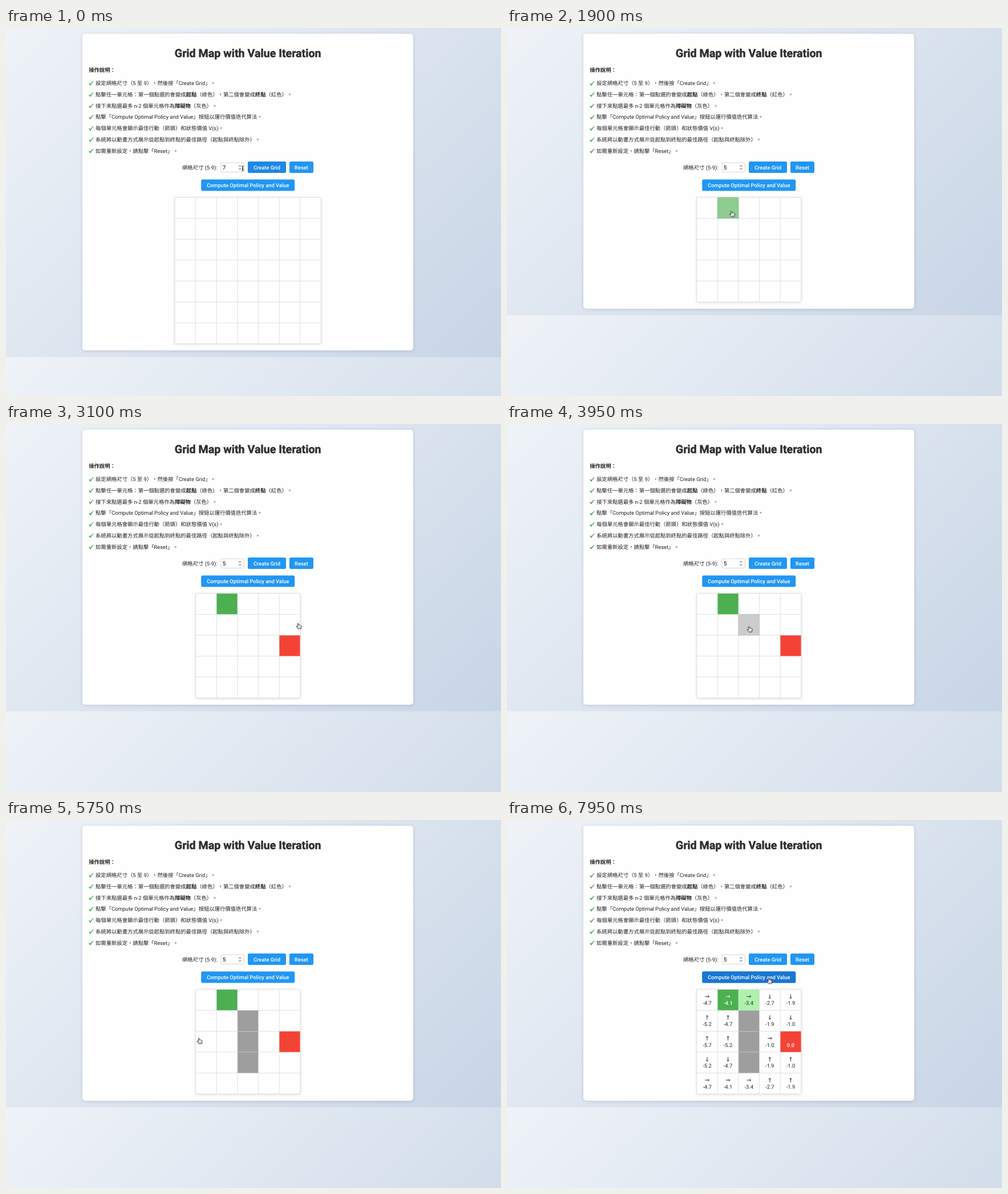
Animation of 868 by 645 pixels, one loop 8000 ms. Source, as an HTML page:

```html
<!DOCTYPE html>
<html lang="zh-Hant">
<head>
<meta charset="utf-8">
<title>Grid Map with Value Iteration</title>
<style>
html, body { margin: 0; width: 100%; height: 100%; overflow: hidden; }
#page { position: absolute; left: 0; top: 0; width: 868px; height: 645px;
  background-image: linear-gradient(135deg, #eff3f8, #c8d5e6); }
#card, #grid { position: absolute; background: #fefefe; }
#card { left: 133.7px; top: 9.6px; width: 580.8px; border-radius: 5px; box-shadow: 0 1px 6px rgba(0,0,0,.13); }
#grid { top: 297px; box-shadow: 0 1px 5px rgba(0,0,0,.14); }
svg { position: absolute; left: 0; top: 0; }
text { font: 9.33px Roboto, "Noto Sans CJK TC", "Noto Sans CJK", sans-serif; fill: #222;
  text-spacing-trim: space-all; text-rendering: geometricPrecision; white-space: pre; }
.b { font-weight: 700; }
.mid { text-anchor: middle; }
.btn { font-weight: 500; fill: #fff; }
.end { font-weight: 500; fill: #fff; }
.field { font-size: 9.77px; fill: #000; }
.title { font-size: 19.66px; font-weight: 700; fill: #2e2e2e; stroke: #2e2e2e; stroke-width: .45px; }
</style>
</head>
<body>
<div id="page">
  <div id="card"></div>
  <div id="grid"></div>
  <svg width="868" height="645"><g id="still"></g><g id="live"></g></svg>
</div>
<script>
const $ = id => document.getElementById(id);
const LOOP = 8000, N = 5, CELL = 36.64, MID = 424.2, TOP = 297, LEFT = MID - N * CELL / 2;
const FADE = 200, CREATED = 900, SOLVED = 7550, WALK = 7862;

const notes = [
  '設定網格尺寸（5 至 9），然後按「Create Grid」。',
  '點擊任一單元格：第一個點選的會變成*起點*（綠色），第二個會變成*終點*（紅色）。',
  '接下來點選最多 n-2 個單元格作為*障礙物*（灰色）。',
  '點擊「Compute Optimal Policy and Value」按鈕以運行價值迭代算法。',
  '每個單元格會顯示最佳行動（箭頭）和狀態價值 V(s)。',
  '系統將以動畫方式展示從起點到終點的最佳路徑（起點與終點除外）。',
  '如需重新設定，請點擊「Reset」。'
];

const clicks = [
  { at: 1830, r: 0, c: 1, color: '#4caf50' },
  { at: 2680, r: 2, c: 4, color: '#f44336' },
  ...[3895, 4270, 4700].map((at, i) => ({ at, r: 1 + i, c: 2, color: '#9e9e9e' }))
];
const [start, goal, ...walls] = clicks;

// Pointer stops in cell units; bow bends the way there sideways.
const stops = [
  { from: 0, to: 0, r: -1.97, c: 1.75 },
  { from: 550, to: 850, r: -1.94, c: 2.57 },
  { from: 1300, to: 1700, r: .1, c: 1 },
  { from: 1850, to: 2550, r: 2.1, c: 4, bow: 2.4 },
  { from: 2700, to: 3500, r: 1, c: 2, bow: 1.4 },
  { from: 4050, to: 4550, r: 2.65, c: 2 },
  { from: 5150, to: 5450, r: 3.1, c: .6 },
  { from: 5650, to: 5800, r: 1.3, c: -.67 },
  { from: 5800, to: 6500, r: -1.12, c: 2.94 }
];

const clamp = v => Math.max(0, Math.min(1, v));
const ease = v => 1 - (1 - clamp(v)) ** 2.2;
const same = (a, r, c) => a.r === r && a.c === c;
const text = (x, y, s, cls = '') => `<text x="${x}" y="${y}" class="${cls}">${s}</text>`;
const rect = (x, y, w, h, extra) => `<rect x="${x}" y="${y}" width="${w}" height="${h}" ${extra}/>`;
const shape = (x, y, d, extra, angle = 0) => `<path transform="translate(${x} ${y}) rotate(${angle})" d="${d}" ${extra}/>`;

const button = (x, y, w, label, dark = 0) =>
  rect(x, y, w, 20, 'rx="2.5" fill="#2196f3"') +
  rect(x, y, w, 20, `rx="2.5" fill="#1976d2" opacity="${dark}"`) +
  text(x + w / 2, y + 13.5, label, 'btn mid');

// Value iteration: each step costs 1, discount 0.9; ties go to the earlier direction.
function solve() {
  const dirs = [[-1, 0, -90], [1, 0, 90], [0, -1, 180], [0, 1, 0]];
  const cells = [];
  for (let r = 0; r < N; r++) for (let c = 0; c < N; c++)
    if (!walls.some(w => same(w, r, c))) cells.push({ r, c, value: 0 });
  for (let sweep = 0; sweep < 30; sweep++) for (const cell of cells) {
    if (same(goal, cell.r, cell.c)) continue;
    let best = -Infinity;
    for (const [dr, dc, angle] of dirs) {
      const next = cells.find(o => same(o, cell.r + dr, cell.c + dc));
      if (next && next.value > best) {
        best = next.value;
        Object.assign(cell, { next, angle });
      }
    }
    cell.value = .9 * best - 1;
  }
  return cells;
}
const cells = solve();
const firstStep = cells.find(o => same(start, o.r, o.c)).next;
const fills = [...clicks, { at: WALK, r: firstStep.r, c: firstStep.c, color: '#90ee90' }];

function drawStill() {
  let out = text(MID, 50.8, 'Grid Map with Value Iteration', 'title mid') + text(145.2, 76.5, '操作說明：', 'b');
  notes.forEach((note, i) => {
    const y = 100.2 + i * 19.74;
    out += shape(145, y, 'M.2 -2.6 1.5 -3.6 3 -1.9Q5 -5.3 8 -7.2L8.6 -6.5Q5.6 -3.8 3.4 .6L2.5 .8Z', 'fill="#4caf50"') +
      text(157, y, note.replace(/\*(.+?)\*/g, '<tspan class="b">$1</tspan>'));
  });
  $('still').innerHTML = out + text(309, 247.6, '網格尺寸 (5-9):');
}

function pointerAt(t) {
  const i = stops.findLastIndex(s => t >= s.from);
  const b = stops[i], a = stops[i - 1] || b;
  const p = b.to > b.from ? clamp((t - b.from) / (b.to - b.from)) : 1;
  const e = p * p * (3 - 2 * p), bend = (b.bow || 0) * Math.sin(Math.PI * e);
  const c = a.c + (b.c - a.c) * e + bend, r = a.r + (b.r - a.r) * e - bend / 2;
  return [LEFT + (c + .5) * CELL, TOP + 3 + (r + .5) * CELL];
}

function drawPointer(t, x, y, left, size) {
  const inside = (a, b, w, h) => x > a && x < a + w && y > b && y < b + h;
  if (inside(376, 236, 42, 17))
    return shape(x, y, 'M-2 -4.2Q0 -4.2 0 -3V3Q0 4.2 -2 4.2M2 -4.2Q0 -4.2 0 -3V3Q0 4.2 2 4.2M-1.2 1H1.2',
      'fill="none" stroke="#222" stroke-width=".9"');
  if (inside(left, TOP, size, size) || inside(342, 265, 164, 21) || (t < CREATED && inside(424, 234, 67, 20)))
    return shape(x, y, 'M-.9 .6Q0 -.5 .9 .6L1.4 3.2Q2.2 2.4 3 3.3 4 2.8 4.6 3.8 5.8 3.6 6 4.8 6 7 5 9.6H0Q-1.5 7.5 -3 5.8 -3 4.6 -1.6 5L-.4 6Z',
      'fill="#fff" stroke="#111" stroke-width=".85"') +
      shape(x, y, 'M1.2 6V8M2.7 6V8M4.2 6V8', 'stroke="#333" stroke-width=".5"');
  return shape(x, y, 'M0 0V8.4L2 6.6 3.3 9.6 4.7 9 3.4 6.1H6.1Z', 'fill="#000" stroke="#fff" stroke-width=".6"');
}

function drawCells(t, px, py) {
  let out = '';
  for (const { at, r, c, color } of fills) {
    if (t <= at) continue;
    const x = LEFT + c * CELL, y = TOP + r * CELL;
    const over = px > x && px < x + CELL && py > y && py < y + CELL;
    const gap = over ? -.4 : .25, side = CELL - 2 * gap;
    out += rect(x + gap, y + gap, side, side, `fill="${color}" opacity="${ease((t - at) / FADE)}"`);
  }
  if (t < SOLVED) return out;
  for (const { r, c, value, next, angle } of cells) {
    const x = LEFT + (c + .5) * CELL, y = TOP + r * CELL;
    const end = same(start, r, c) || same(goal, r, c);
    out += text(x, y + 27.4, value.toFixed(1), end ? 'end mid' : 'mid');
    if (next) out += shape(x, y + 12.4, 'M-3.7 0H3.3M1.4 -1.9 3.5 0 1.4 1.9',
      `fill="none" stroke="${end ? '#fff' : '#222'}" stroke-width=".95"`, angle);
  }
  return out;
}

function draw(t) {
  const n = t < CREATED ? 7 : N, size = n * CELL, left = MID - size / 2;
  $('page').style.backgroundSize = `868px ${320.3 + size}px`;
  $('card').style.height = 299.4 + size + 'px';
  Object.assign($('grid').style, { left: left + 'px', width: size + 'px', height: size + 'px' });

  let lines = '';
  for (let k = 0; k <= n; k++)
    lines += `M${left + k * CELL} ${TOP}v${size}M${left} ${TOP + k * CELL}h${size}`;
  const createDark = .45 * (1 - clamp(t / 100)) + ease((t - 700) / FADE) * (1 - ease((t - CREATED) / FADE));
  const [x, y] = pointerAt(t);
  $('live').innerHTML =
    rect(376.9, 236.1, 40.6, 16.4, 'rx="2.4" fill="#fff" stroke="#ccc" stroke-width=".8"') +
    text(379.8, 247.6, t < 350 ? 7 : t < 500 ? 6 : 5, 'field') +
    shape(410.2, 244.3, 'M-2 -1.5 0 -3.6 2 -1.5M-2 1.5 0 3.6 2 1.5', 'fill="none" stroke="#444"') +
    button(424, 234, 67, 'Create Grid', createDark) +
    button(497, 234, 42, 'Reset') +
    button(342.2, 265.4, 164, 'Compute Optimal Policy and Value', ease((t - 6400) / FADE)) +
    `<path d="${lines}" stroke="#d8d8d8" stroke-width=".8"/>` +
    drawCells(t, x, y) +
    drawPointer(t, x, y, left, size);
}

drawStill();
const begin = performance.now();
function tick() {
  draw((performance.now() - begin) % LOOP);
  requestAnimationFrame(tick);
}
tick();
</script>
</body>
</html>
```
